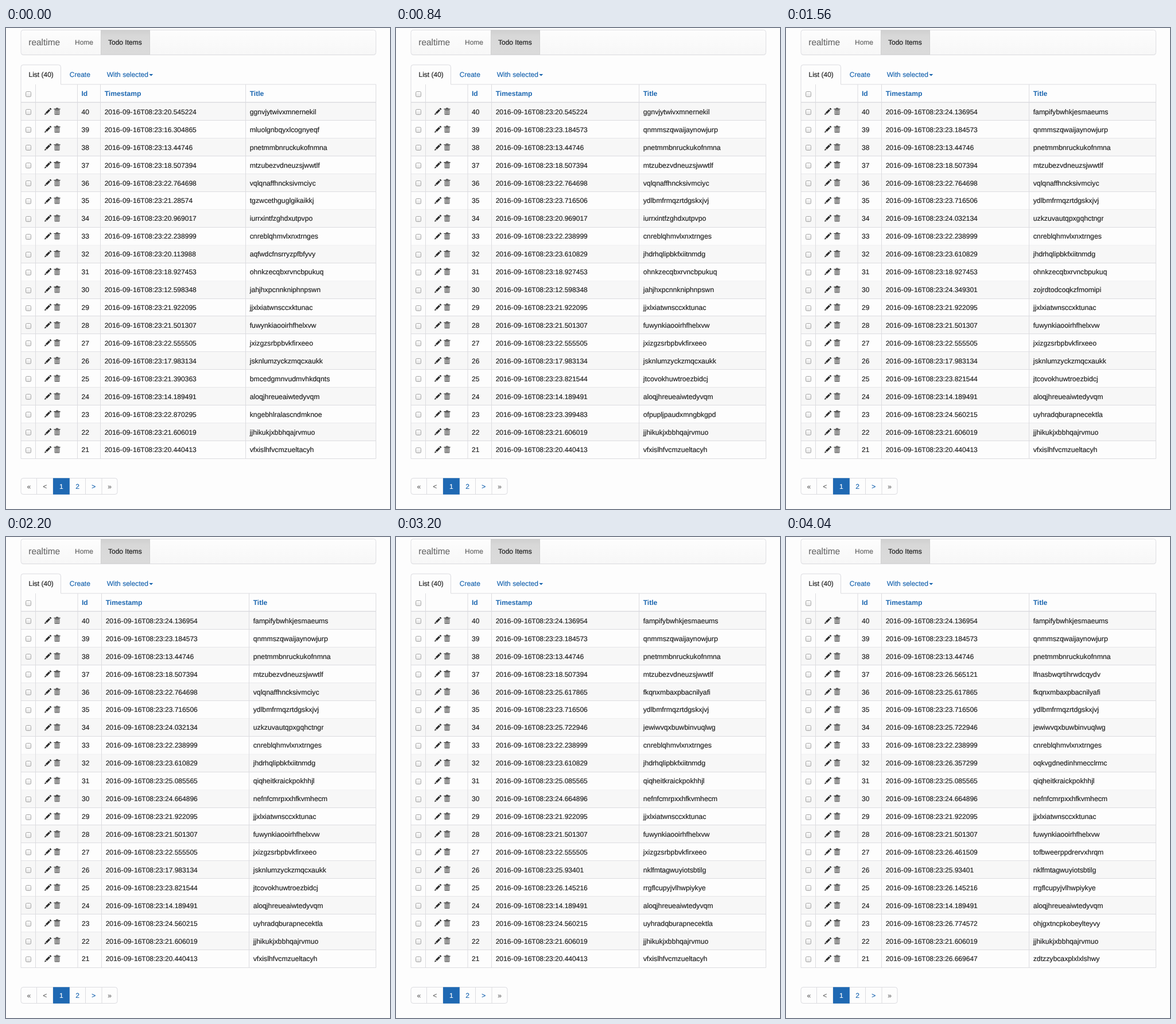
An HTML page that plays this animation: 669x836 px, repeating every 4.08 s.

```html
<!DOCTYPE html>
<html lang="en">
<head>
<meta charset="utf-8">
<title>Realtime list</title>
<style>
  html, body { margin: 0; width: 100%; height: 100%; overflow: hidden; background: #fdfdfd; }
  svg { display: block; width: 669px; height: 836px; }
  text { font: 12px "Liberation Sans", Arial, sans-serif; color: #1e1e1e; fill: currentColor; stroke: currentColor; stroke-width: .18px; white-space: pre; text-rendering: geometricPrecision; }
  .brand { font-size: 15.4px; color: #6a6a6a; }
  .muted { color: #666; }
  .link { color: #1b66b0; fill: #1b66b0; }
  .head { color: #1b66b0; font-weight: bold; font-size: 12.1px; stroke: none; }
  .current { color: #fff; }
  .dash { letter-spacing: .6px; }
  .title { font-size: 12.25px; }
  .mid { text-anchor: middle; }
  .line { fill: none; stroke: #dcdce0; }
</style>
</head>
<body>
<svg id="stage" viewBox="0 0 669 836">
  <defs>
    <linearGradient id="bar" x2="0" y2="1"><stop stop-color="#fdfdfd"/><stop offset="1" stop-color="#f7f7f7"/></linearGradient>
    <linearGradient id="pressed" x2="0" y2="1"><stop stop-color="#d0d0d0"/><stop offset=".25" stop-color="#d8d8d8"/><stop offset="1" stop-color="#dbdbdb"/></linearGradient>
    <linearGradient id="box" x2="0" y2="1"><stop stop-color="#fff"/><stop offset="1" stop-color="#e2e2e2"/></linearGradient>
    <g id="check"><rect x="34.5" y="-4.5" width="9" height="9" rx="2" fill="url(#box)" stroke="#a4a4a4"/></g>
    <g id="tools" fill="#2b2b2b">
      <path d="M67 6l1.2-3.5 2.3 2.3zM68.9 1.8l5.9-5.9 2.3 2.3-5.9 5.9zM75.5-4.8l1.2-1.1q.5-.4 1 0l1.3 1.3q.4.5 0 1l-1.2 1.1z"/>
      <path d="M83.5-4.8h3.6v-1.5h3.8v1.5h3.6v1.3h-11zM88-5.4v.6h2v-.6z" fill-rule="evenodd"/>
      <path d="M85-2.6h8v8h-8zM87.1-2.6v8M89-2.6v8M90.9-2.6v8" fill="#d8d8d8" stroke="#3a3a3a" stroke-width=".75"/>
    </g>
  </defs>
</svg>
<script>
const LOOP = 4080, STEP = 40, CLOCK_START = 23.01;
const ROW_TOP = 129.8, ROW_HEIGHT = 30.93;
const NARROW_TITLE_AT = 23.821544; // the longest title leaves the list and columns reflow
const DATE = '2016-09-16T08:23:'.replaceAll('-', '<tspan class="dash">-</tspan>');

const initial = `20.545224 ggnvjytwivxmnernekil
16.304865 mluolgnbqyxlcognyeqf
13.44746 pnetmmbnruckukofnmna
18.507394 mtzubezvdneuzsjwwtlf
22.764698 vqlqnaffhncksivmciyc
21.28574 tgzwcethguglgikaikkj
20.969017 iurrxintfzghdxutpvpo
22.238999 cnreblqhmvlxnxtrnges
20.113988 aqfwdcfnsrryzpfbfyvy
18.927453 ohnkzecqbxrvncbpukuq
12.598348 jahjhxpcnnkniphnpswn
21.922095 jjxlxiatwnsccxktunac
21.501307 fuwynkiaooirhfhelxvw
22.555505 jxizgzsrbpbvkfirxeeo
17.983134 jsknlumzyckzmqcxaukk
21.390363 bmcedgmnvudmvhkdqnts
14.189491 aloqjhreueaiwtedyvqm
22.870295 kngebhlralascndmknoe
21.606019 jjhikukjxbbhqajrvmuo
20.440413 vfxislhfvcmzueltacyh`.split('\n').map(s => s.split(' '));

const updates = `39 23.184573 qnmmszqwaijaynowjurp
23 23.399483 ofpupljpaudxmngbkgpd
32 23.610829 jhdrhqlipbkfxiitnmdg
35 23.716506 ydlbmfrmqzrtdgskxjvj
25 23.821544 jtcovokhuwtroezbidcj
34 24.032134 uzkzuvautqpxgqhctngr
40 24.136954 fampifybwhkjesmaeums
30 24.349301 zojrdtodcoqkzfmomipi
23 24.560215 uyhradqburapnecektla
30 24.664896 nefnfcmrpxxhfkvmhecm
31 25.085565 qiqheitkraickpokhhjl
36 25.617865 fkqnxmbaxpbacnilyafi
34 25.722946 jewiwvqxbuwbinvuqlwg
26 25.93401 nklfmtagwuyiotsbtilg
25 26.145216 rrgflcupyjvlhwpiykye
32 26.357299 oqkvgdnedinhmecclrmc
27 26.461509 tofbweerppdrervxhrqm
37 26.565121 lfnasbwqrtihrwdcqydv
21 26.669647 zdtzzybcaxplxlxlshwy
23 26.774572 ohjgxtncpkobeylteyvy`.split('\n').map(s => s.split(' '));

const text = (x, y, cls, str) => `<text x="${x}" y="${y}" class="${cls}">${str}</text>`;
const line = d => `<path class="line" d="${d}"/>`;
const use = (id, y) => `<use href="#${id}" y="${y}"/>`;

function navbar() {
  return `<rect x="26.5" y="5" width="618" height="42.5" rx="4" fill="#efefef"/>
    <rect x="26" y="3.5" width="618.5" height="43" rx="4" fill="url(#bar)" stroke="#dedee2"/>
    <rect x="165.5" y="4" width="85" height="42" fill="url(#pressed)" stroke="#d0d0d0"/>`
    + text(39.3, 30.3, 'brand', 'realtime') + text(120, 29.4, 'muted', 'Home')
    + text(178, 29.4, '', 'Todo Items');
}

function tabs() {
  return line('M26 98V68q0-4 4-4h61.5q4 0 4 4v30H644.5')
    + text(39.5, 85.3, '', 'List (40)') + text(110.8, 85.3, 'link', 'Create')
    + text(175.8, 85.3, 'link', 'With selected')
    + '<path class="link" d="M249.3 80h7l-3.5 3.6z"/>';
}

function table() {
  let out = '';
  const bottom = ROW_TOP + ROW_HEIGHT * initial.length;
  initial.forEach((_, i) => {
    const y = ROW_TOP + ROW_HEIGHT * i;
    if (i % 2 === 0) out += `<rect x="26" y="${y}" width="618.5" height="${ROW_HEIGHT}" fill="#f7f7f7"/>`;
    const edge = Math.floor(y + ROW_HEIGHT) + .5;
    out += line(`M26 ${edge}H644.5`) + use('check', Math.round(y + 16.6)) + use('tools', y + 15.3);
  });
  return out + `<path class="line" d="M26 129.3H644.5" stroke-width="1.6"/>`
    + line(`M26 98V${bottom}M51.5 98V${bottom}M644.5 98V${bottom}`)
    + use('check', 115) + '<g id="columns"></g>';
}

function pager() {
  const labels = ['«', '&lt;', '1', '2', '&gt;', '»'];
  const styles = ['muted', 'muted', 'current', 'link', 'link', 'muted'];
  const edges = [26, 53.5, 82, 110.5, 138.5, 167, 194];
  return line('M30 782.5H190q4 0 4 4v20q0 4-4 4H30q-4 0-4-4v-20q0-4 4-4z')
    + line(edges.slice(1, 6).map(x => `M${x} 782.5v28`).join(''))
    + '<rect x="82" y="782.3" width="28.8" height="28.5" fill="#1f69b3"/>'
    + labels.map((s, i) => text((edges[i] + edges[i + 1]) / 2, 801, 'mid ' + styles[i], s)).join('');
}

document.getElementById('stage').insertAdjacentHTML('beforeend', navbar() + tabs() + table() + pager());
const columns = document.getElementById('columns');

function render(time) {
  const now = Math.floor(time / STEP) * STEP;
  const due = seconds => now >= (seconds - CLOCK_START) * 1000;
  const rows = initial.slice();
  for (const [id, seconds, title] of updates) {
    if (due(seconds)) rows[40 - id] = [seconds, title];
  }
  const [a, b, c] = due(NARROW_TITLE_AT) ? [125, 166.5, 423.5] : [124.5, 164.5, 417.5];
  const [idX, stampX, titleX] = [a + 7, b + 7.2, c + 7.2];
  const bottom = ROW_TOP + ROW_HEIGHT * rows.length;
  columns.innerHTML = line(`M${a} 98V${bottom}M${b} 98V${bottom}M${c} 98V${bottom}`)
    + text(idX, 118.2, 'head', 'Id') + text(stampX, 118.2, 'head', 'Timestamp') + text(titleX, 118.2, 'head', 'Title')
    + rows.map(([seconds, title], i) => {
      const y = ROW_TOP + ROW_HEIGHT * i + 20;
      return text(idX, y, '', 40 - i) + text(stampX, y, '', DATE + seconds)
        + text(titleX, y, 'title', title);
    }).join('');
}

const start = performance.now();
let shown = -1;
function tick() {
  const time = (performance.now() - start) % LOOP;
  const step = Math.floor(time / STEP);
  if (step !== shown) render(time);
  shown = step;
  requestAnimationFrame(tick);
}
tick();
</script>
</body>
</html>
```
